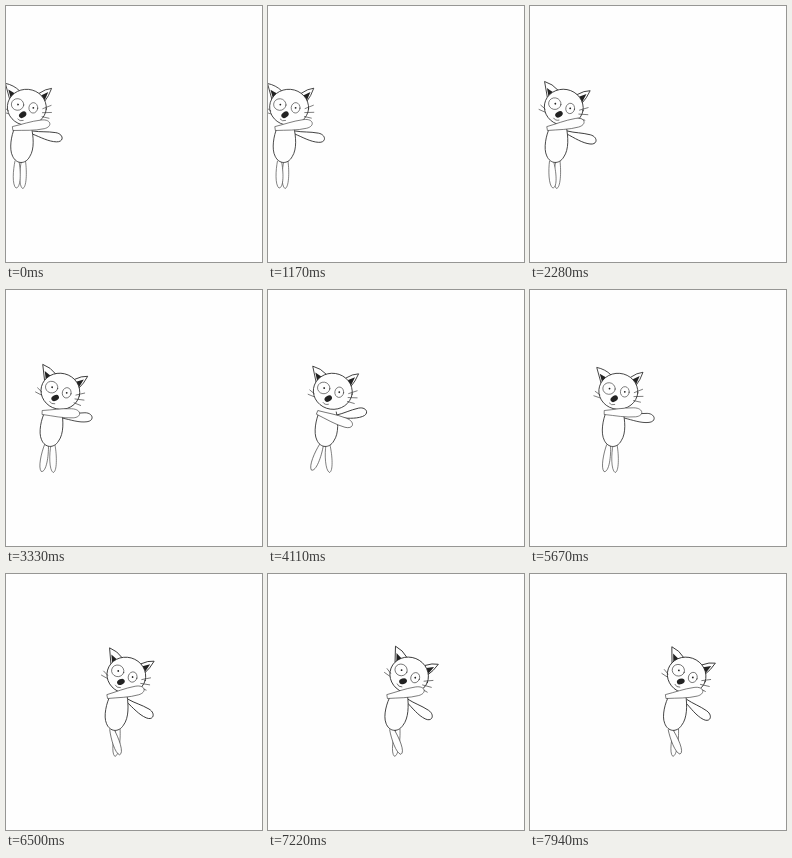
An HTML page that plays this animation: 256 by 256 pixels, repeating every 8000 ms.

```html
<!DOCTYPE html>
<html lang="en">
<head>
<meta charset="utf-8">
<title>Strolling cat</title>
<style>
  html, body { margin: 0; width: 100%; height: 100%; overflow: hidden; background: #fefefe; }
  svg { display: block; width: 100%; height: 100%; }
  .line { fill: #fefefe; stroke: #222; stroke-width: .8; stroke-linecap: round; stroke-linejoin: round; }
  .thin { stroke-width: .6; stroke: #333; }
  .ink { fill: #222; stroke: none; }
  .open { fill: none; }
</style>
</head>
<body>
<svg viewBox="0 0 256 256">
  <g id="cat" class="line">
    <path id="backArm" d="M0-2C8-2 14-4 23-4C31-4 33 4 25 5C17 6 9 3 0 1"/>
    <g class="thin">
      <path id="rightLeg" d="M-2 0C-4 9-4 25 0 27.5C4 27 4 11 2 0"/>
      <path id="leftLeg" d="M-2 0C-4 9-5 24-1 27C4 27 4 11 2 0"/>
    </g>
    <path id="body" d="M-8-16C-11-9-13 5-9 12C-5 20 4 20 8 12C13 4 11-9 9-17"/>
    <g id="head">
      <path d="M-18-7L-23.5-22Q-15-21-9-16M11-15Q17-20 23-21Q21-13 17-7"/>
      <path class="ink" d="M-17-8L-20-16Q-16-14-13.5-13ZM13-13L20-17L17-8Z"/>
      <ellipse rx="19.5" ry="18"/>
      <ellipse class="thin" cx="-9.5" cy="-2" rx="6.2" ry="5.8"/>
      <ellipse class="thin" cx="6.5" cy="0" rx="4.4" ry="5.2"/>
      <circle class="ink" cx="-9" cy="-2" r=".9"/>
      <circle class="ink" cx="6.5" cy="0" r=".9"/>
      <ellipse class="ink" cx="-3.5" cy="7.8" rx="4" ry="2.8" transform="rotate(-40 -3.5 7.8)"/>
      <path class="open thin" d="M-8 12.5Q-6 15-2.5 13.5M-23 2L-18 5M-24 6.5L-18 8M16 0L24-4M16 4L25 3M16 8L23 9"/>
    </g>
    <path id="frontArm" class="thin" d="M0-2C10-3 18-5 29-5C39-5 40 3 31 4C21 5 11 3 0 2Z"/>
  </g>
</svg>
<script>
  const DURATION = 8000, FPS = 18;
  const LAST_FRAME = DURATION * FPS / 1000 - 1;

  // Body positions at even intervals: a slow start, then an uneven stroll
  const INTERVAL = 20;
  const stops = [16, 16, 25.5, 45.5, 64, 80, 116, 141, 168];

  const STRIDE = 12.5, SWAY = 80, WARM_UP = 87;
  const wave = (frame, peak, period) => Math.cos(2 * Math.PI * (frame - peak) / period);

  const place = (id, x, y, angle) =>
    document.getElementById(id).setAttribute('transform', `translate(${x} ${y}) rotate(${angle})`);

  function bodyX(frame) {
    const i = Math.floor(frame / INTERVAL);
    return stops[i] + (stops[i + 1] - stops[i]) * (frame / INTERVAL - i);
  }

  function draw(frame) {
    const vigour = Math.min(1, frame / WARM_UP);
    const swing = vigour * wave(frame, WARM_UP, STRIDE);
    const tilt = 5 + 0.06 * frame + 9 * vigour * wave(frame, 52, SWAY);

    place('cat', bodyX(frame), 138, 0);
    place('head', 2.5 + 0.47 * tilt, -36.7, tilt);
    place('body', 0, 0.5, 0.35 * tilt);
    place('frontArm', -9, -15.5, -7 + 19 * swing + 18 * swing ** 2);
    place('backArm', 10.5, -11, 9 - 26 * swing);
    place('leftLeg', -5, 17, 24 * swing);
    place('rightLeg', 1.5, 17, 2 - 6 * swing);
  }

  function tick() {
    const time = performance.now() % DURATION;
    draw(Math.min(LAST_FRAME, Math.floor((time + 5) * FPS / 1000)));
    requestAnimationFrame(tick);
  }
  tick();
</script>
</body>
</html>
```
